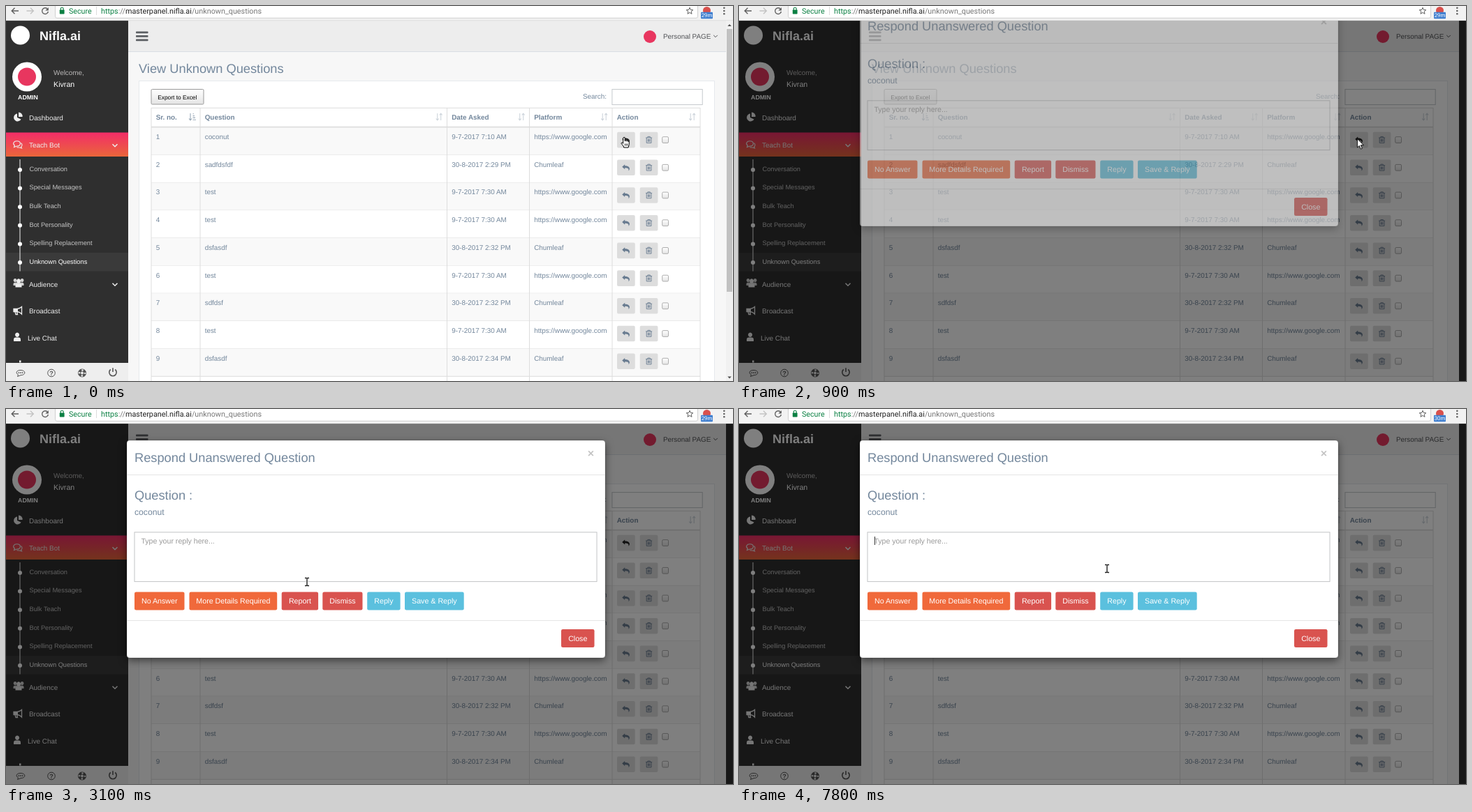
An HTML page that plays this animation: 1041x538 px, repeating every 8000 ms.

```html
<!DOCTYPE html>
<html lang="en">
<head>
<meta charset="utf-8">
<title>Unknown questions</title>
<style>
html, body { margin: 0; width: 100%; height: 100%; overflow: hidden; background: #2b2b2b; }
svg { display: block; width: 100%; height: 100%; }
text { font-family: "Liberation Sans", Arial, sans-serif; text-rendering: geometricPrecision; white-space: pre; }
.bar text { font-family: Roboto, sans-serif; }
.box { filter: drop-shadow(0 4px 6px rgba(0,0,0,.5)); }
</style>
</head>
<body>
<svg id="stage" viewBox="0 0 1041 538" preserveAspectRatio="none"></svg>
<script>
const INK = '#73879c', PINK = '#e8365f';

const text = (x, y, s, size = 9.9, fill = INK, extra = '') =>
  `<text x="${x}" y="${y}" font-size="${size}" fill="${fill}" ${extra}>${s.replace(/&/g, '&amp;')}</text>`;
const rect = (x, y, w, h, fill, extra = '') =>
  `<rect x="${x}" y="${y}" width="${w}" height="${h}" fill="${fill}" ${extra}/>`;
const line = (x1, y1, x2, y2, color, w = 1) =>
  `<path d="M${x1} ${y1}L${x2} ${y2}" stroke="${color}" stroke-width="${w}"/>`;
const disc = (x, y, r, fill, extra = '') =>
  `<circle cx="${x}" cy="${y}" r="${r}" fill="${fill}" ${extra}/>`;
const solid = (x, y, d, fill, extra = '') =>
  `<path transform="translate(${x} ${y})" d="${d}" fill="${fill}" ${extra}/>`;
const stroke = (x, y, d, color, w = 1.2) =>
  solid(x, y, d, 'none', `stroke="${color}" stroke-width="${w}"`);
const bold = 'font-weight="700"', middle = 'text-anchor="middle"';

const chevron = (x, y, r, color, w) => stroke(x, y, `M${-r} ${-r / 2}L0 ${r / 2}L${r} ${-r / 2}`, color, w);
const replyIcon = (x, y, color, extra = '') =>
  solid(x, y, 'M-5.5 -1L-1.5 -4.5V-2.5C3 -2.5 5.5 -.5 5.2 2C5 3.5 4.2 4.3 3.6 4.8C4.4 1.5 3 .7 -1.5 .6V2.6Z', color, extra);
const trashIcon = (x, y) =>
  stroke(x, y, 'M-4.5 -3H4.5M-1.7 -3V-4.6H1.7V-3M-3.4 -3V4.4H3.4V-3M-1.4 -1.2V2.8M0 -1.2V2.8M1.4 -1.2V2.8', '#687b90', .9);
const sortIcon = (x, y) =>
  stroke(x, y, 'M-2.5 -5V4.5M-4.5 2.5L-2.5 4.8L-.5 2.5M2.5 5V-4.5M.5 -2.5L2.5 -4.8L4.5 -2.5', '#ced5dc', 1.1);

function sidebar() {
  const white = '#eee', grey = '#c4c4c4';
  const subs = ['Conversation', 'Special Messages', 'Bulk Teach', 'Bot Personality', 'Spelling Replacement', 'Unknown Questions'];
  let s = rect(0, 21, 175, 517, '#2f2f2f');
  s += disc(20.5, 42, 13.5, '#fff') + text(48, 49, 'Nifla.ai', 18, '#fff', bold);
  s += disc(30, 101.5, 21, '#fff') + disc(30, 101.5, 13, PINK);
  s += text(31.5, 133.5, 'ADMIN', 8.8, '#fff', bold + middle);
  s += text(68, 98.5, 'Welcome,', 9.9, '#bab8b8') + text(68, 116, 'Kivran', 10.7, '#fff');

  s += solid(17, 159.5, 'M-1 -5A5.5 5.5 0 1 0 4.5 3L-1 .5Z', white) + solid(18, 158.5, 'M0 -6A5.5 5.5 0 0 1 5.5 .5H0Z', white);
  s += text(33, 164, 'Dashboard', 10, white);
  s += rect(0, 181.5, 175, 34.5, 'url(#hot)');
  s += stroke(16, 198, 'M-.5 -4.2C6 -4.2 6 3 -.5 3L-4.5 4.5L-3.6 2C-7 -.5 -5 -4.2 -.5 -4.2Z M5.5 -1.5C8 1 7 3.5 5.5 4L6.5 6L3 5C1.5 5.2 .5 5 -.5 4.5', white, 1.1);
  s += text(33, 203, 'Teach Bot', 9.9, white) + chevron(156, 200, 3.5, white, 1.5);

  s += rect(0, 354, 175, 26.5, '#3a3a3a') + line(20, 220, 20, 380.5, '#e4e4e4', 1.1);
  subs.forEach((name, i) => {
    const y = 235 + i * 26.6;
    s += disc(20, y, 3, '#fff') + text(33.5, y + 1.8, name, 9.25, i === 5 ? '#fff' : grey);
  });

  const head = 'a2.4 2.6 0 1 1 .1 0Z';
  s += solid(18, 397, `M-5 -.8${head}M5 -.8${head}M-7.5 4V1.5Q-7.5 -.2 -5 -.2H5Q7.5 -.2 7.5 1.5V4Z`, white, 'opacity=".85"');
  s += solid(18, 397, 'M0 1a3 3.4 0 1 1 .1 0ZM-4.5 6.5V4Q-4.5 1.5 -2 1.5H2Q4.5 1.5 4.5 4V6.5Z', white);
  s += text(33, 402.5, 'Audience', 9.9, white) + chevron(156, 399.5, 3.5, white, 1.5);
  s += stroke(17, 437, 'M-6 -2.5H-1Q3 -3 5.5 -5.5V5Q3 2 -1 1.5H-6ZM-4 1.5L-3 5.5H-.5L-1.5 1.5', white, 1.3);
  s += rect(11, 434.5, 6, 4, white) + text(33, 441, 'Broadcast', 9.9, white);
  s += solid(16, 475, 'M0 0a3 3.3 0 1 1 .1 0ZM-5 6V3.5Q-5 .5 -2 .5H2Q5 .5 5 3.5V6Z', white);
  s += text(31, 480, 'Live Chat', 9.9, white) + rect(19, 508.5, 2.5, 3, white);

  const dark = '#555';
  s += rect(0, 512, 175, 26, '#eee');
  s += stroke(21, 526.5, 'M0 -4C7.8 -4 7.8 3.2 0 3.2L-4.5 5L-3.5 2.4C-7.8 0 -6 -4 0 -4Z', dark, 1);
  s += [-2.6, 0, 2.6].map(d => disc(21 + d, 526.2, .9, dark)).join('');
  s += disc(65, 526.5, 5.3, 'none', `stroke="${dark}"`) + text(65, 529.7, '?', 9, dark, bold + middle);
  s += disc(109, 526.5, 4, 'none', `stroke="${dark}" stroke-width="3.6" stroke-dasharray="3.9 2.38" stroke-dashoffset="-1.2"`);
  s += disc(109, 526.5, 5.6, 'none', `stroke="${dark}" stroke-width=".8"`) + disc(109, 526.5, 2.4, 'none', `stroke="${dark}" stroke-width=".8"`);
  s += stroke(153, 525.5, 'M-3.2 -4A5.2 5.2 0 1 0 3.2 -4M0 -6.2V-.5', dark, 1.6);
  return s;
}

function table() {
  const cols = [208, 278, 631.5, 749.5, 868, 994];
  const heads = ['Sr. no.', 'Question', 'Date Asked', 'Platform', 'Action'];
  const site = 'https://www.google.com', app = 'Chumleaf', early = '9-7-2017 7:30 AM';
  const rows = [
    ['coconut', '9-7-2017 7:10 AM', site], ['sadfdsfdf', '30-8-2017 2:29 PM', app],
    ['test', early, site], ['test', early, site], ['dsfasdf', '30-8-2017 2:32 PM', app],
    ['test', early, site], ['sdfdsf', '30-8-2017 2:32 PM', app],
    ['test', early, site], ['dsfasdf', '30-8-2017 2:34 PM', app]];
  const rule = '#ddd', step = 39.7, top = 174;
  let s = rect(208, 146, 786, 392, '#fff');
  rows.forEach((row, i) => {
    const y = top + i * step, mid = y + 18;
    s += rect(208, y, 786, step, i % 2 ? '#fff' : '#f9f9f9');
    [i + 1, ...row].forEach((v, c) => s += text(cols[c] + 6.7, y + 17, String(v), 9.9));
    s += rect(875, mid - 11.2, 25.7, 22.6, '#ddd', 'rx="2"') + rect(907.7, mid - 11.2, 25.7, 22.6, '#ddd', 'rx="2"');
    s += replyIcon(887.7, mid, '#687b90', i ? '' : 'id="reply"') + trashIcon(920.6, mid);
    s += rect(939.7, mid - 4.3, 8.8, 8.8, 'url(#grey)', 'stroke="#a5a5a5" stroke-width=".9" rx="1.5"');
    s += line(208, y + step, 994, y + step, rule);
  });
  s += line(208, 146.3, 994, 146.3, rule) + line(208, top - .4, 994, top - .4, rule, 1.8);
  cols.forEach(x => s += line(x, 146, x, 538, rule));
  heads.forEach((h, c) => {
    s += text(cols[c] + 6.7, 163, h, 9.9, INK, bold);
    if (c) s += sortIcon(cols[c + 1] - 11.3, 159);
  });
  s += stroke(267, 159, 'M-3 -5V4.5M-5 2.5L-3 4.8L-1 2.5M.5 -4.2H2M.5 -1.4H3M.5 1.4H4M.5 4.2H5', '#9aa9b8', 1.1);
  return s;
}

function page() {
  let s = rect(175, 21, 856, 517, '#f7f7f7') + rect(175, 21, 856, 44.5, '#ededed') + line(175, 65.5, 1031, 65.5, '#d9dee4');
  [36.5, 42, 47.5].forEach(y => s += rect(186, y, 17.5, 2.7, '#5c5f63', 'rx=".8"'));
  s += disc(922, 44, 9, PINK) + text(941, 46.8, 'Personal PAGE', 9.86, '#515356') + chevron(1016, 43.3, 2.8, '#515356', 1);
  s += text(190, 96.3, 'View Unknown Questions', 18.26);
  s += rect(190.5, 107.5, 824, 440, '#fff', 'stroke="#e6e9ed"');
  s += rect(208, 119.5, 75, 21.5, 'url(#grey)', 'stroke="#999" rx="1.5"');
  s += text(245.3, 133.6, 'Export to Excel', 8.35, '#000', middle);
  s += text(826, 132.7, 'Search:') + rect(867.9, 119.6, 129.3, 22, '#fff', 'stroke="#c4c8cc"');
  return s + table();
}

function scrollbar() {
  return rect(1031, 21, 10, 517, '#f1f1f1') + rect(1032, 33, 8, 377, '#c1c1c1') +
    solid(1036, 27.5, 'M-2.7 1.4L0 -1.6L2.7 1.4Z', '#505050') + solid(1036, 533, 'M-2.7 -1.4L0 1.6L2.7 -1.4Z', '#505050');
}

function modal() {
  const orange = '#f0693b', red = '#d9534f', blue = '#5bc0de';
  const button = (x, y, w, label, fill) =>
    rect(x, y, w, 26, fill, 'rx="2.3"') + text(x + w / 2, y + 16.8, label, 10.67, '#fff', middle);
  let s = rect(173, 45, 685, 312, '#fff', 'rx="4" stroke="rgba(0,0,0,.2)" stroke-width=".8" class="box"');
  s += text(184, 75.5, 'Respond Unanswered Question', 18.25) + text(837.5, 68.5, '×', 16, '#c4c4c4', bold + middle);
  s += line(173, 94.5, 858, 94.5, '#e5e5e5') + line(173, 303.5, 858, 303.5, '#e5e5e5');
  s += text(184, 130, 'Question :', 18.25) + text(184, 152, 'coconut', 12.2);
  s += rect(184, 176.8, 662, 70.8, '#fff', 'stroke="#c2c4c6"') + text(193.4, 193, 'Type your reply here...', 10.6, '#999');
  s += rect(194, 183, 1, 12, '#333', 'id="caret"');
  s += button(184, 262.5, 71.5, 'No Answer', orange) + button(262.5, 262.5, 125.7, 'More Details Required', orange);
  s += button(394.7, 262.5, 52.4, 'Report', red) + button(453.3, 262.5, 57.2, 'Dismiss', red);
  s += button(517.2, 262.5, 47.4, 'Reply', blue) + button(571, 262.5, 84.7, 'Save & Reply', blue);
  return s + button(795, 316, 47.5, 'Close', red);
}

function browserBar() {
  const grey = '#5f5f5f', green = '#0b8043';
  let s = rect(0, 0, 1041, 21, '#f2f2f2') + rect(70.5, -6, 920, 23.3, '#fff', 'rx="2.5" stroke="#c6c6c6" stroke-width=".8"');
  s += line(0, 20.7, 1041, 20.7, '#d0d0d0', .6);
  s += stroke(13, 7, 'M5 0H-4.5M-.5 -4.3L-4.8 0L-.5 4.3', grey, 1.4) + stroke(34.5, 7, 'M-5 0H4.5M.5 -4.3L4.8 0L.5 4.3', '#c3c3c3', 1.4);
  s += stroke(56, 7, 'M3.2 -3A4.4 4.4 0 1 0 4.4 1', grey, 1.4) + solid(56, 7, 'M4.9 -5V-.4H.3Z', grey);
  s += rect(76.8, 5.6, 6.8, 5.8, green, 'rx=".7"') + stroke(80.2, 5.5, 'M-2 .5V-1.2A2 2 0 0 1 2 -1.2V.5', green, 1.1);
  s += text(90, 10.6, 'Secure', 10.7, green) + line(129.5, 1, 129.5, 13, '#ddd');
  s += `<text x="136" y="10.6" font-size="10.8" fill="#777"><tspan fill="${green}">https</tspan>://<tspan fill="#222">masterpanel.nifla.ai</tspan>/unknown_questions</text>`;
  s += stroke(979, 7, 'M0 -4.8L1.4 -1.5L4.8 -1.3L2.2 .9L3 4.3L0 2.4L-3 4.3L-2.2 .9L-4.8 -1.3L-1.4 -1.5Z', grey, 1);
  s += disc(1003.5, 6.5, 5.5, '#d9504c') + rect(995, 8.7, 17, 9.5, '#3f7fd0', 'rx="1"');
  s += text(1003.5, 16.4, '29m', 7.8, '#fff', 'id="badge" ' + middle);
  [2.8, 7, 11.2].forEach(y => s += disc(1028.3, y, 1.3, grey));
  return s;
}

const pointers = {
  hand: solid(0, 0, 'M3.2 1.6Q3.2 .4 4.4 .4T5.7 1.6V5.6L7 5.2L8 5.7L9.3 5.5L10.2 6.2Q11.8 6 11.8 7.6V10.5L10.6 15H4.2L3.6 13L.6 9.4Q.2 8 1.6 8L3.2 9.2Z', '#fff', 'stroke="#000"') +
    stroke(0, 0, 'M5.8 9.5V12.5M7.7 9.5V12.5M9.5 9.5V12.5', '#000', .8),
  arrow: solid(0, 0, 'M.4 .6V13L3.3 10.4L5.2 15.2L7.3 14.3L5.3 9.7H9.4Z', '#fff', 'stroke="#000" stroke-width=".9"'),
  beam: stroke(0, 0, 'M-3 -5.5H-1L0 -4.8L1 -5.5H3M-3 5.5H-1L0 4.8L1 5.5H3M0 -5V5', '#fff', 2.8) +
    stroke(0, 0, 'M-3 -5.5H-1L0 -4.8L1 -5.5H3M-3 5.5H-1L0 4.8L1 5.5H3M0 -5V5', '#222', 1.4)
};

const stage = document.getElementById('stage');
const grad = (id, a, b) => `<linearGradient id="${id}" x2="0" y2="1"><stop stop-color="${a}"/><stop offset="1" stop-color="${b}"/></linearGradient>`;
stage.innerHTML = `<defs>${grad('hot', '#f22d68', '#ea663a')}${grad('grey', '#fff', '#e4e4e4')}</defs>` +
  rect(0, 0, 1041, 538, '#2f2f2f') + page() + sidebar() + `<g id="scroll">${scrollbar()}</g>` +
  rect(0, 21, 1041, 517, '#000', 'id="dim"') + `<g id="modal">${modal()}</g><g class="bar">${browserBar()}</g><g id="pointer"></g>`;

// time, pointer shape, x, y
const path = [
  [0, 'hand', 880.5, 188], [800, 'arrow', 885, 190], [1200, 'arrow', 885, 190], [1300, 'arrow', 872, 193],
  [1400, 'beam', 820, 200], [1500, 'beam', 758, 209], [1700, 'beam', 637, 232], [1800, 'beam', 560, 243],
  [1900, 'beam', 492, 247], [2000, 'arrow', 448, 250], [2100, 'arrow', 430, 250], [2400, 'arrow', 430, 250],
  [2600, 'arrow', 429, 248], [2700, 'arrow', 429, 248], [2800, 'arrow', 429, 247], [3000, 'arrow', 429, 247],
  [3100, 'beam', 431, 248], [3800, 'beam', 431, 248], [3900, 'arrow', 435, 250], [4300, 'arrow', 481, 260],
  [4400, 'arrow', 481, 260], [4600, 'arrow', 488, 254], [4700, 'arrow', 497, 250], [4800, 'beam', 506, 240],
  [4900, 'beam', 510, 230], [5100, 'beam', 505, 214], [5300, 'beam', 499, 208], [6200, 'beam', 499, 208],
  [6500, 'beam', 560, 234], [6600, 'beam', 586, 244], [6700, 'arrow', 588, 247], [6800, 'beam', 575, 243],
  [7100, 'beam', 527, 229], [8000, 'beam', 527, 229]];
// time, shade, modal opacity, modal offset
const opening = [[0, 0, 0, -78], [700, .1, 0, -78], [800, .35, 0, -78], [900, .5, .5, -41], [1000, .5, 1, -12], [1100, .5, 1, -2], [1200, .5, 1, 0]];
const blinks = [5400, 5900, 6400, 7300, 7800];

const part = Object.fromEntries(['scroll', 'dim', 'modal', 'caret', 'reply', 'badge', 'pointer'].map(id => [id, document.getElementById(id)]));
const show = (el, on) => el.setAttribute('visibility', on ? 'inherit' : 'hidden');
const lastBefore = (keys, t) => keys.findLastIndex(k => k[0] <= t);
let shape = '';

function draw(t) {
  const [, shade, alpha, dy] = opening[lastBefore(opening, t)];
  show(part.scroll, t < 700);
  part.dim.setAttribute('opacity', shade);
  show(part.modal, alpha > 0);
  part.modal.setAttribute('opacity', alpha);
  part.modal.setAttribute('transform', `translate(0 ${dy})`);
  show(part.caret, blinks.filter(b => b <= t).length % 2);
  part.reply.setAttribute('fill', t < 5400 ? '#222' : '#687b90');
  part.badge.textContent = t < 6000 ? '29m' : '30m';

  const i = lastBefore(path, t), a = path[i], b = path[i + 1];
  const f = a[1] === b[1] ? (t - a[0]) / (b[0] - a[0]) : 0;
  if (shape !== a[1]) part.pointer.innerHTML = pointers[shape = a[1]];
  part.pointer.setAttribute('transform', `translate(${a[2] + (b[2] - a[2]) * f} ${a[3] + (b[3] - a[3]) * f})`);
}

const start = performance.now();
function tick(now) {
  draw(Math.floor(Math.max(0, now - start) % 8000 / 100) * 100);
  requestAnimationFrame(tick);
}
draw(0);
requestAnimationFrame(tick);
</script>
</body>
</html>
```
